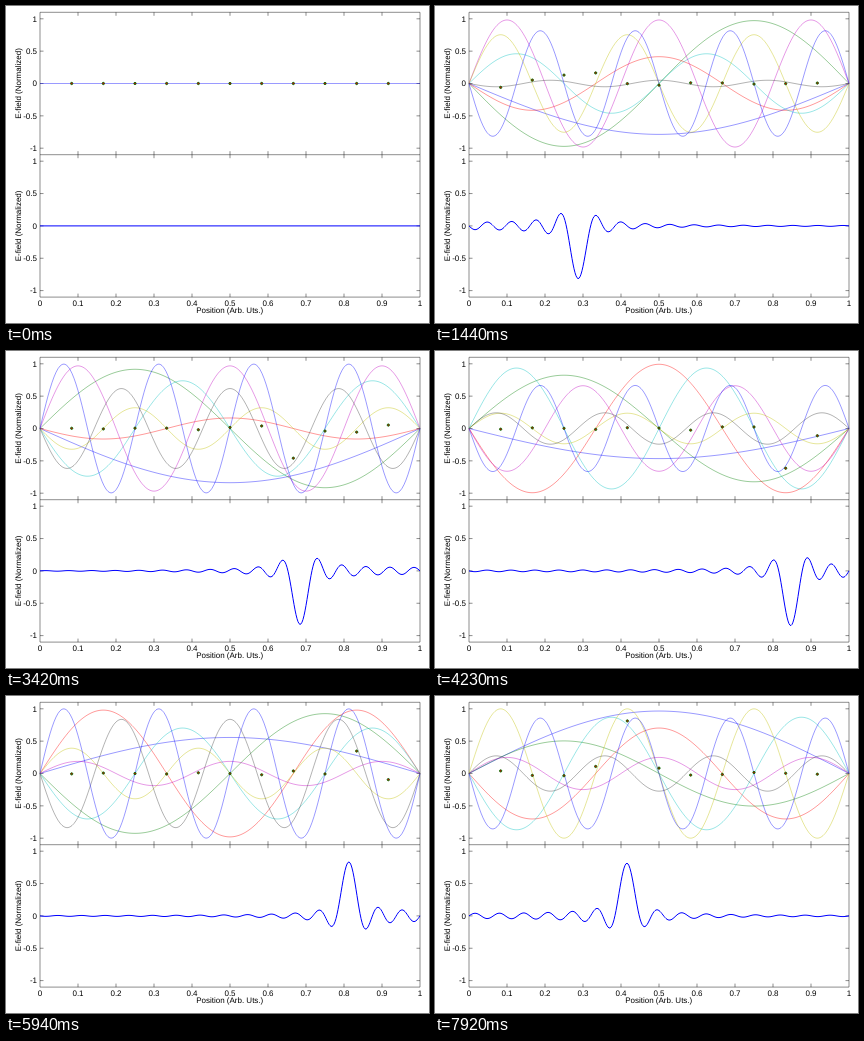
Recreate the animation shown at these times as an HTML page. Size 423 px wide and 317 px high, loop 8000 ms.

```html
<!DOCTYPE html>
<html lang="en">
<head>
<meta charset="utf-8">
<title>Cavity modes and their sum</title>
<style>
  html, body { margin: 0; width: 100%; height: 100%; overflow: hidden; background: #fff; }
  svg { display: block; width: 100%; height: 100%; }
  text { font: 8px "Liberation Sans", Arial, sans-serif; fill: #000; text-rendering: geometricPrecision; }
  path { fill: none; stroke-linejoin: round; }
  .axis { stroke: #000; stroke-width: 0.45; }
  .wave { stroke-width: 0.4; }
  .dot { fill: #d00000; stroke: #007000; stroke-width: 0.9; }
  .pulse { stroke: #00f; stroke-width: 1; }
</style>
</head>
<body>
<svg id="stage" viewBox="0 0 423 317"></svg>
<script>
const LOOP = 8000, STEP = 90, SPEED = 0.018;
const MODES = 31, PEAK = 19.17;
const LEFT = 34, WIDTH = 380, RIGHT = LEFT + WIDTH;
const UNIT = 64.7, HALF = 71.2, TOP_MID = 77.5, BOTTOM_MID = TOP_MID + 2 * HALF;
const COLORS = ['#00f', '#007f00', '#f00', '#00bfbf', '#bf00bf', '#bfbf00', '#404040', '#00f'];
const DOTS = 11;

const svg = document.getElementById('stage');

function add(tag, attrs, text) {
  const el = document.createElementNS('http://www.w3.org/2000/svg', tag);
  for (const key in attrs) el.setAttribute(key, attrs[key]);
  if (text !== undefined) el.textContent = text;
  svg.appendChild(el);
  return el;
}

const px = x => LEFT + WIDTH * x;

function drawAxes(mid) {
  const top = mid - HALF, bottom = mid + HALF;
  let d = '';
  for (let i = 1; i < 10; i++) {
    const x = px(i / 10);
    d += `M${x} ${top}v3.5M${x} ${bottom}v-3.5`;
  }
  for (let v = -1; v <= 1; v += 0.5) {
    const y = mid - v * UNIT;
    d += `M${LEFT} ${y}h3.5M${RIGHT} ${y}h-3.5`;
    add('text', { x: 31, y: y + 2.8, 'text-anchor': 'end' }, v);
  }
  add('path', { class: 'axis', d });
  add('text', { transform: `translate(15.2 ${mid}) rotate(-90)`, 'text-anchor': 'middle' }, 'E-field (Normalized)');
}

// Path through fn(x) for x in 0..1
function curve(fn, mid, count) {
  let d = '';
  for (let i = 0; i <= count; i++) {
    const x = i / count;
    d += (i ? 'L' : 'M') + px(x).toFixed(2) + ' ' + (mid - UNIT * fn(x)).toFixed(2);
  }
  return d;
}

const amplitude = (n, pos) => -Math.sin(n * Math.PI * pos);

function field(x, pos) {
  let sum = 0;
  for (let n = 1; n <= MODES; n++) sum += amplitude(n, pos) * Math.sin(n * Math.PI * x);
  return sum / PEAK;
}

const seam = TOP_MID + HALF;
add('path', {
  class: 'axis',
  d: `M${LEFT} ${TOP_MID - HALF}H${RIGHT}V${BOTTOM_MID + HALF}H${LEFT}ZM${LEFT} ${seam}H${RIGHT}`
});
drawAxes(TOP_MID);
drawAxes(BOTTOM_MID);
for (let i = 0; i <= 10; i++) {
  add('text', { x: px(i / 10), y: 299.6, 'text-anchor': 'middle' }, i / 10);
}
add('text', { x: 223.7, y: 307.4, 'text-anchor': 'middle' }, 'Position (Arb. Uts.)');

const waves = COLORS.map(stroke => add('path', { class: 'wave', stroke }));
const dots = Array.from({ length: DOTS }, (_, i) =>
  add('circle', { class: 'dot', cx: px((i + 1) / (DOTS + 1)), r: 1.15 }));
const pulse = add('path', { class: 'pulse' });

function render(time) {
  const step = Math.floor((time % LOOP) / STEP);
  const pos = step * SPEED;
  waves.forEach((wave, i) => {
    const n = i + 1, a = amplitude(n, pos);
    // All waves coincide when flat: show only the topmost
    const covered = step === 0 && n < COLORS.length;
    wave.setAttribute('d', covered ? '' : curve(x => a * Math.sin(n * Math.PI * x), TOP_MID, 190));
  });
  dots.forEach((dot, i) => dot.setAttribute('cy', TOP_MID - UNIT * field((i + 1) / (DOTS + 1), pos)));
  pulse.setAttribute('d', curve(x => field(x, pos), BOTTOM_MID, 380));
}

const start = performance.now();
function tick() {
  render(performance.now() - start);
  requestAnimationFrame(tick);
}
tick();
</script>
</body>
</html>
```
